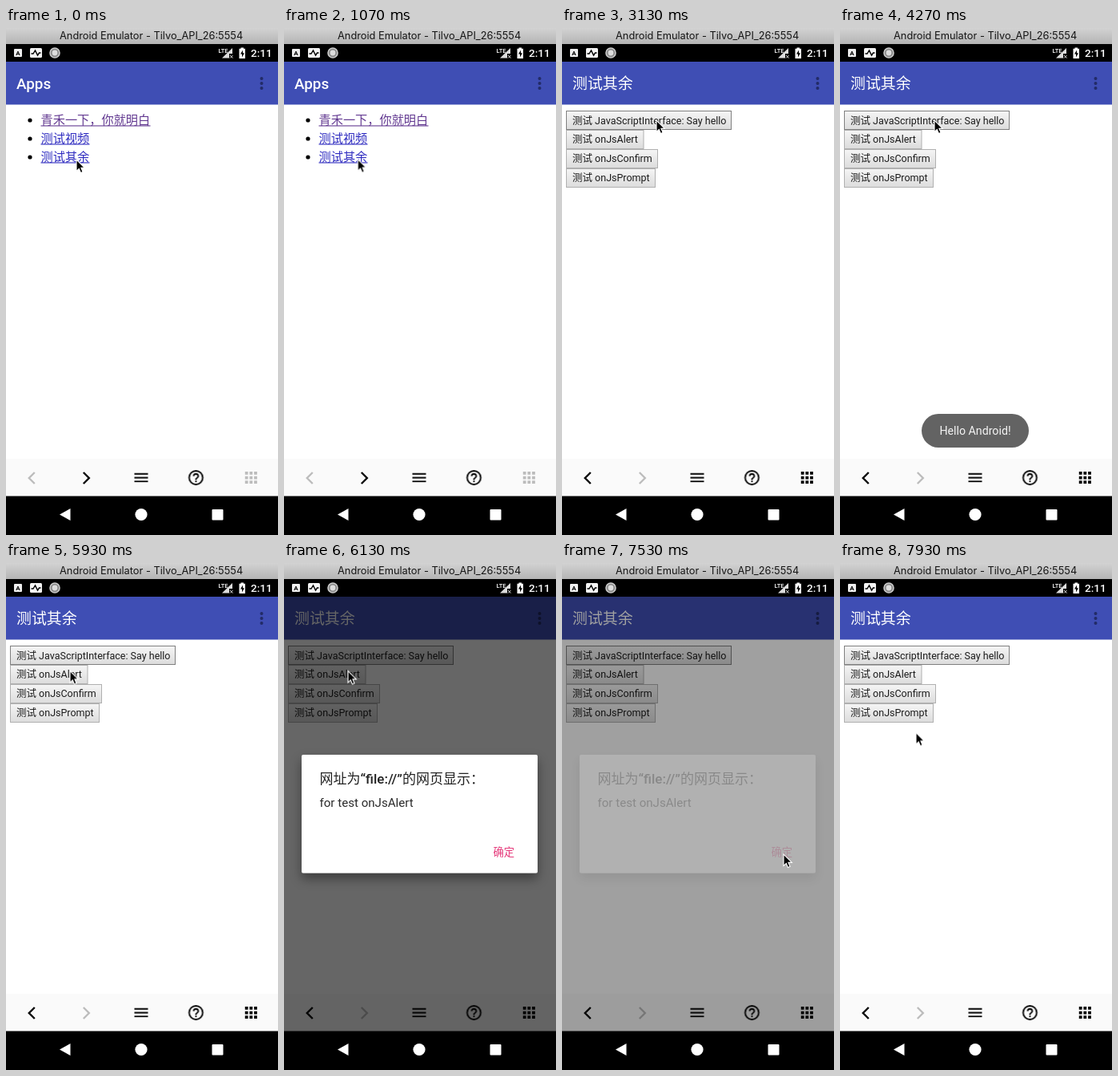
An HTML page that plays this animation: 340 by 632 pixels, repeating every 8000 ms.

```html
<!DOCTYPE html>
<html lang="zh-CN">
<head>
<meta charset="utf-8">
<title>WebView demo</title>
<style>
html, body { margin: 0; width: 100%; height: 100%; overflow: hidden; background: #fff; }
svg { display: block; width: 100%; height: 100%; }
text { font-family: Roboto, "Noto Sans CJK SC", "Noto Sans CJK", sans-serif; white-space: pre; }
.window-title { font: 12.8px Inter, sans-serif; }
.bar-title { font-size: 18.9px; fill: #fff; }
.link { font-size: 15.2px; }
.button rect { fill: url(#button-face); stroke: #b0b0b0; }
.button.focused rect { stroke: #808080; }
.button text { font-size: 12.5px; fill: #1c1c1c; }
.chevron { fill: none; stroke-width: 2.4; }

.before, .after, .list, .tests, .toast, .dim, .dialog, .cursor {
  animation: 8s linear infinite;
}
.before { animation-name: before; animation-timing-function: step-end; }
.after { animation-name: after; animation-timing-function: step-end; }
.list { animation-name: list; animation-timing-function: step-end; }
.tests { animation-name: tests; animation-timing-function: step-end; }
.toast { animation-name: toast; }
.dim { animation-name: dim; }
.dialog { animation-name: dialog; }
.cursor { animation-name: cursor; animation-timing-function: ease-in-out; }

@keyframes before { 0% { opacity: 1 } 22.45%, 100% { opacity: 0 } }
@keyframes after { 0% { opacity: 0 } 22.45%, 100% { opacity: 1 } }
@keyframes list { 0% { opacity: 1 } 24.1%, 100% { opacity: 0 } }
@keyframes tests { 0% { opacity: 0 } 24.1%, 100% { opacity: 1 } }
@keyframes toast {
  0%, 45% { opacity: 0 }
  47.5%, 68.5% { opacity: 1 }
  71%, 100% { opacity: 0 }
}
@keyframes dim {
  0%, 75% { opacity: 0 }
  76.5%, 93.19% { opacity: .6 }
  95.69%, 100% { opacity: 0 }
}
@keyframes dialog {
  0%, 75% { opacity: 0 }
  76.5%, 93.12% { opacity: 1 }
  94.37%, 100% { opacity: 0 }
}
@keyframes cursor {
  0%, 8% { transform: translate(88px, 164px) }
  16%, 27% { transform: translate(93.5px, 163.5px) }
  38%, 60% { transform: translate(118px, 115px) }
  69%, 78% { transform: translate(80px, 134.5px) }
  90%, 94.6% { transform: translate(277px, 363px) }
  99%, 100% { transform: translate(95px, 211.5px) }
}
</style>
</head>
<body>
<svg viewBox="0 0 340 632" preserveAspectRatio="none">
  <defs>
    <linearGradient id="window-bar" x2="0" y2="1">
      <stop stop-color="#d2d2d2"/><stop offset="1" stop-color="#b4b4b4"/>
    </linearGradient>
    <linearGradient id="button-face" x2="0" y2="1">
      <stop stop-color="#f5f5f5"/><stop offset="1" stop-color="#dcdcdc"/>
    </linearGradient>
    <filter id="shadow" x="-15%" y="-20%" width="130%" height="150%">
      <feDropShadow dx="0" dy="7" stdDeviation="7" flood-opacity=".4"/>
    </filter>
    <path id="left" d="M35.800 554 28.800 561l7 7"/>
    <path id="right" d="M96.800 554l7 7-7 7"/>
    <path id="menu" d="M3 6h18v2H3zM3 11h18v2H3zM3 16h18v2H3z"/>
    <path id="help" d="M11 18h2v-2h-2zm1-16a10 10 0 1 0 0 20 10 10 0 0 0 0-20zm0 18a8 8 0 1 1 0-16 8 8 0 0 1 0 16zm0-14a4 4 0 0 0-4 4h2a2 2 0 1 1 4 0c0 2-3 1.75-3 5h2c0-2.25 3-2.5 3-5a4 4 0 0 0-4-4z"/>
    <path id="grid" stroke="currentColor" stroke-width="4" stroke-dasharray="4 2" d="M4 6h16M4 12h16M4 18h16" transform="translate(295 549.2) scale(.944)"/>
  </defs>

  <rect width="340" height="632" fill="#fff"/>

  <!-- Page: links -->
  <g class="list">
    <circle cx="30" cy="115" r="2.6"/><circle cx="30" cy="138" r="2.6"/><circle cx="30" cy="161" r="2.6"/>
    <g class="link" fill="#643b92">
      <text x="43.5" y="120">青禾一下，你就明白</text><rect x="43.5" y="121.4" width="137" height="1.1"/>
    </g>
    <g class="link" fill="#2f2cc0">
      <text x="43.5" y="143">测试视频</text><rect x="43.5" y="144.4" width="61" height="1.1"/>
      <text x="43.5" y="166">测试其余</text><rect x="43.5" y="167.4" width="61" height="1.1"/>
    </g>
  </g>

  <!-- Page: test buttons -->
  <g class="tests">
    <g class="button focused"><rect x="5.5" y="103.5" width="206" height="23"/><text x="13" y="119.5">测试 JavaScriptInterface: Say hello</text></g>
    <g class="button"><rect x="5.5" y="127.5" width="96.5" height="23"/><text x="13" y="143.3">测试 onJsAlert</text></g>
    <g class="button"><rect x="5.5" y="151.5" width="114" height="23"/><text x="13" y="167.2">测试 onJsConfirm</text></g>
    <g class="button"><rect x="5.5" y="175.5" width="111" height="23"/><text x="13" y="191">测试 onJsPrompt</text></g>
  </g>

  <!-- App bar -->
  <rect y="42" width="340" height="53.5" fill="#3f4eb4"/>
  <text class="bar-title before" x="13" y="76" font-weight="500">Apps</text>
  <text class="bar-title after" x="13" y="76">测试其余</text>
  <g fill="#222b66"><circle cx="319.5" cy="63" r="2"/><circle cx="319.5" cy="69" r="2"/><circle cx="319.5" cy="75" r="2"/></g>

  <!-- Toolbar -->
  <rect y="537" width="340" height="47" fill="#fafafa"/>
  <g class="before">
    <use class="chevron" href="#left" stroke="#bcbcbc"/><use class="chevron" href="#right" stroke="#000"/>
    <use href="#grid" color="#bcbcbc"/>
  </g>
  <g class="after">
    <use class="chevron" href="#left" stroke="#000"/><use class="chevron" href="#right" stroke="#bcbcbc"/>
    <use href="#grid" color="#000"/>
  </g>
  <g transform="translate(0 549.2) scale(.944)">
    <use href="#menu" x="167"/><use href="#help" x="239.5"/>
  </g>

  <g class="toast">
    <rect x="102" y="481" width="134" height="42" rx="21" fill="#636363"/>
    <text x="169" y="507.3" font-size="14.2" text-anchor="middle" fill="#f4f4f4">Hello Android!</text>
  </g>

  <rect class="dim" y="42" width="340" height="542"/>
  <g class="dialog">
    <rect x="22" y="239" width="295" height="147.5" rx="2" fill="#fff" filter="url(#shadow)"/>
    <text x="44.5" y="274.5" font-size="17" fill="#222">网址为<tspan font-weight="500">“file://”</tspan>的网页显示：</text>
    <text x="44.5" y="303.5" font-size="15.1" fill="#2a2a2a">for test onJsAlert</text>
    <text x="261.5" y="364.7" font-size="13.3" fill="#e5397a">确定</text>
  </g>

  <!-- Window and status bars -->
  <rect width="340" height="20" fill="url(#window-bar)"/>
  <text class="window-title" x="67" y="14" fill="#161616">Android Emulator - Tilvo_API_26:5554</text>
  <rect y="20" width="340" height="22"/>
  <rect x="10" y="26" width="10" height="10" rx="1" fill="#eee"/>
  <text x="15" y="34" font-size="8" font-weight="700" text-anchor="middle">A</text>
  <rect x="30" y="25" width="15" height="12" rx="1.5" fill="#f4f4f4"/>
  <path d="M31.500 32h2.500l2.500-4 3 6 2-3h2" fill="none" stroke="#000" stroke-width="1.4"/>
  <circle cx="61" cy="31" r="6" fill="#888" stroke="#ccc" stroke-width="1.6"/>
  <circle cx="61" cy="31" r="3.4" fill="#ddd"/>
  <text x="265.5" y="30.500" font-size="7.5" font-weight="500" fill="#fff">LTE</text>
  <path d="M270 37.500 283 25v7h-4v5.500z" fill="#ddd"/>
  <path d="M280 34l3.500 3.500m0-3.500-3.500 3.500" stroke="#ddd"/>
  <path d="M293.500 24.500h3.500v1.300h2v12.200h-7.500V25.800h2z" fill="#fff"/>
  <path d="M296 27.500l-3 5h2v4l3-5.200h-2z"/>
  <text x="306" y="36" font-size="13.5" font-weight="500" fill="#fff">2:11</text>

  <!-- Navigation bar -->
  <rect y="583.5" width="340" height="48.5"/>
  <g fill="#fff">
    <path d="M67 606.500 80.500 599v15z"/>
    <circle cx="169" cy="606.5" r="7.6"/>
    <rect x="257.5" y="600" width="14" height="13.5" rx="1"/>
  </g>

  <g class="cursor">
    <path d="M0 0V14.500L3.300 11.400 5.400 16.500 8 15.400 5.900 10.400H10.300Z" stroke="#fff" stroke-width="1.1"/>
  </g>
</svg>
</body>
</html>
```
